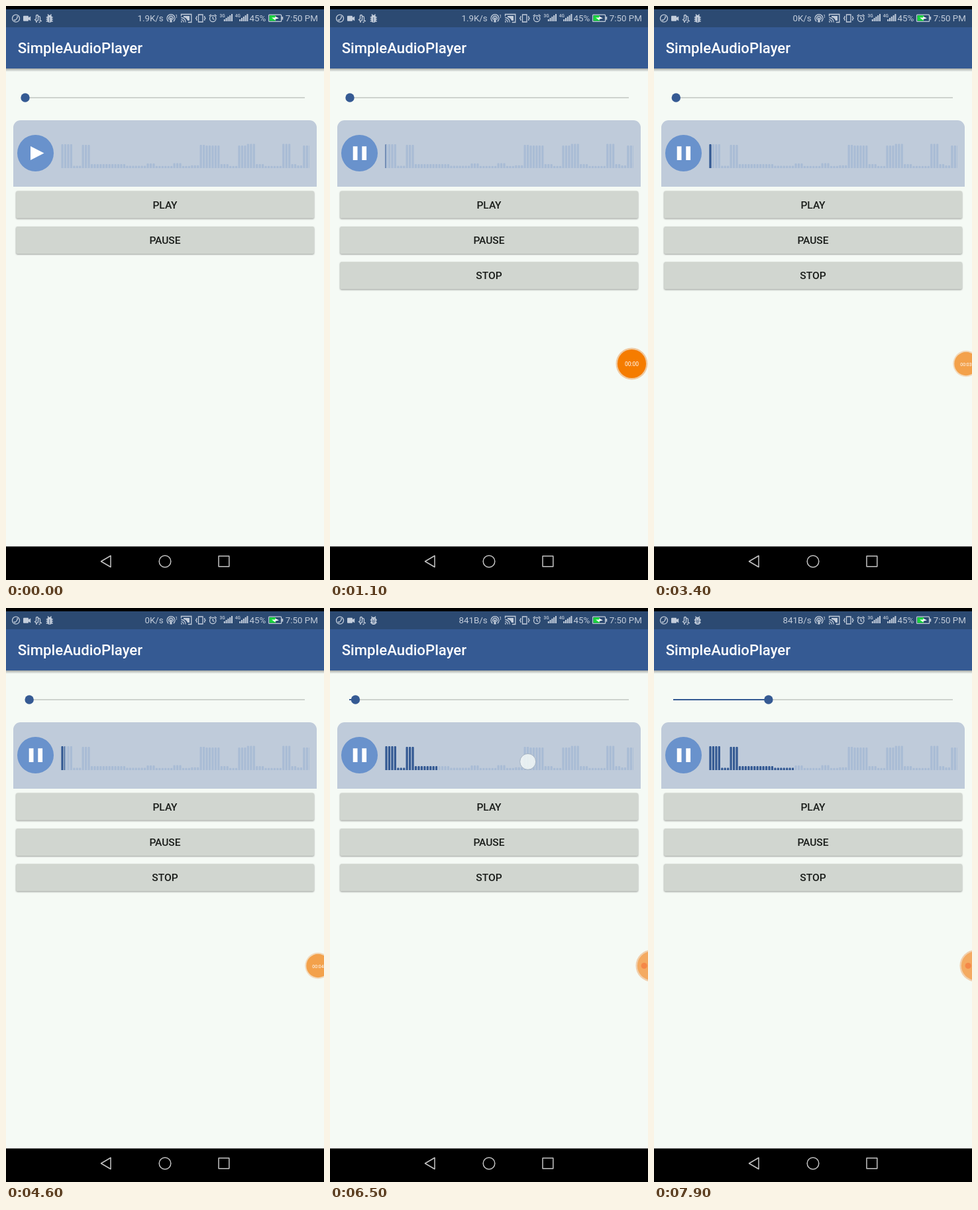
An HTML page for the animation above (8000 ms loop, 480x864 px).

```html
<!DOCTYPE html>
<html lang="en">
<head>
<meta charset="utf-8">
<title>Audio player</title>
<style>
  html, body { margin: 0; width: 100%; height: 100%; overflow: hidden; background: #f5faf5; }
  svg { display: block; width: 480px; height: 864px; font-family: Roboto, sans-serif; }
  .medium { font-weight: 500; }
  .status { font-size: 13.33px; fill: #c3cddb; }
  .icon { fill: #c3cddb; }
  .line { fill: none; stroke: #c3cddb; stroke-width: 1.3; }
  .button rect { fill: #d1d6d0; filter: drop-shadow(0 1px 1px rgba(0,0,0,.38)); }
  .button text { font-size: 15.55px; font-weight: 500; fill: #181b18; text-anchor: middle; }
  .nav { fill: none; stroke: #c4c4c4; stroke-width: 1.5; stroke-linejoin: round; }
</style>
</head>
<body>
<svg viewBox="0 0 480 864">
  <defs>
    <linearGradient id="shade" x2="0" y2="1">
      <stop offset="0" stop-color="#000" stop-opacity=".32"/>
      <stop offset="1" stop-color="#000" stop-opacity="0"/>
    </linearGradient>
    <clipPath id="played"><rect id="playedBox" x="83" y="200" width="0" height="50"/></clipPath>
    <clipPath id="waveBox"><rect x="83" y="200" width="375" height="50"/></clipPath>
    <g id="signal">
      <path d="M0 23h2v-3h-2zM2.8 23h2v-5h-2zM5.6 23h2v-7h-2zM8.4 23h2v-9h-2zM11.2 23h2v-11h-2z"/>
    </g>
  </defs>

  <rect width="480" height="864" fill="#f5faf5"/>
  <rect y="94" width="480" height="5" fill="url(#shade)"/>
  <rect width="480" height="6" fill="#000"/>
  <rect y="5" width="480" height="27" fill="#2c4a72"/>
  <rect y="32" width="480" height="62" fill="#355a93"/>
  <text class="medium" x="17.7" y="71" font-size="22.2" fill="#fff">SimpleAudioPlayer</text>

  <!-- status bar, left -->
  <circle class="line" cx="15" cy="18.7" r="5.5" stroke-width="1"/>
  <path class="line" d="M12.6 21.8q3.6-1.2 4.8-5.4M12 20.4l1.8 2M16.2 15.7l2 1"/>
  <rect class="icon" x="26" y="14.8" width="8" height="8" rx="1"/>
  <path class="icon" d="M33 18l4.2-2.6v7L33 19.8z"/>
  <path class="line" stroke-width="1.1" d="M43.5 20.5l2-1V14.5q1.5-2 3 0v7l-3 1zM48.5 16q3-1.5 3 2v4.5h2.5M45 24h2M49.5 24.5h2"/>
  <g id="bug">
    <path class="line" stroke-width="1.1" d="M63 12.5l1.6 2M68.5 12.5l-1.6 2M60.8 17h2M60.8 20h2M60.8 23h2M68.7 17h2M68.7 20h2M68.7 23h2"/>
    <rect class="icon" x="62.3" y="13.8" width="7" height="11" rx="3.4"/>
    <path d="M65.8 17v7" stroke="#2c4a72" stroke-width=".8"/>
  </g>
  <g id="bugAlt">
    <path class="line" stroke-width="1.1" d="M62.5 12.8l1.6 1.8M69 12.8l-1.6 1.8M60.8 18h10M61 22h9.6"/>
    <rect class="icon" x="61.8" y="13.8" width="8" height="11.2" rx="3.8"/>
    <path d="M63.5 17h1.6M66.5 17h1.6M63.2 19.6h5.2M64 22.3h3.6" stroke="#2c4a72" stroke-width="1.1"/>
  </g>

  <!-- status bar, right -->
  <text id="speed" class="status" x="237.7" y="23" text-anchor="end"></text>
  <path class="line" d="M245.3 23.3a6 6 0 1 1 7.4 0M246.7 20.8a3.2 3.2 0 1 1 4.6 0"/>
  <circle class="icon" cx="249" cy="18.9" r="1.6"/>
  <path class="icon" d="M247.8 20h2.4l.6 4.5h-3.6z"/>
  <text class="status" x="255" y="18" font-size="8" style="font-size:8px">1</text>
  <path class="line" stroke-width="1.6" d="M264.5 15.5v-3h15.3v12h-5M264.3 17.5a7 7 0 0 1 7 7M264.3 20.6a4 4 0 0 1 4 4"/>
  <path class="icon" d="M268 15h9v7h-3q-1.5-4.5-6-5zM264 22.6a2 2 0 0 1 2 2h-2z"/>
  <path class="line" stroke-width="1.5" d="M290.5 13h6.5v11h-6.5zM287.8 15v2l-1.3 1.5 1.3 1.5v2M299.7 15v2l1.3 1.5-1.3 1.5v2"/>
  <circle class="line" cx="312.2" cy="19" r="4.7"/>
  <path class="line" d="M312.2 16v3.2l2.3 1.3M306.6 15.3l3-2.6M317.8 15.3l-3-2.6"/>
  <g class="icon medium" font-size="6.5">
    <text x="322.5" y="17">3G</text><use href="#signal" x="328.8"/>
    <text x="345.8" y="17">4G</text><use href="#signal" x="352.2"/>
  </g>
  <text class="status" x="367.6" y="23">45%</text>
  <rect class="line" x="396.6" y="13.2" width="19" height="10.2" rx="1" stroke-width="1.1"/>
  <rect class="icon" x="416.3" y="16" width="1.9" height="4.6"/>
  <rect x="397.6" y="14.2" width="9.5" height="8.2" fill="#19d53c"/>
  <path d="M401 17.6l5.5-.1-.5-2.1 6 3.2-5.6 1.1.4 2z" fill="#fff"/>
  <text class="status" x="421.8" y="23">7:50 PM</text>

  <!-- seek bar -->
  <rect x="29" y="137" width="422" height="2" fill="#ced3ce"/>
  <rect id="seekFill" x="29" y="137" width="0" height="2" fill="#355a93"/>
  <circle id="thumb" cx="29" cy="138" r="6.7" fill="#355a93"/>

  <!-- waveform card -->
  <path d="M11 272V183a11 11 0 0 1 11-11H458a11 11 0 0 1 11 11V272z" fill="#bfcbda"/>
  <circle cx="44.5" cy="221.5" r="27.5" fill="#6992cc"/>
  <path id="playIcon" d="M37 211v21l20.5-10.5z" fill="#fff"/>
  <path id="pauseIcon" d="M34.7 211.3h6.8v20.8h-6.8zM48.3 211.3h6.8v20.8h-6.8z" fill="#fff"/>
  <g clip-path="url(#waveBox)">
    <path id="wave" fill="#a9bcd5"/>
    <path id="waveDone" fill="#355a93" clip-path="url(#played)"/>
  </g>
  <circle id="touch" cy="231.3" r="12" fill="#f1f7f6" fill-opacity=".85" stroke="#a3b1c1" stroke-width="1"/>

  <g id="buttons"></g>

  <g id="bubble">
    <circle id="ring" cy="538.5"/>
    <circle id="disc" cy="538.5"/>
    <text id="clock" y="541.5" text-anchor="middle" fill="#fff"></text>
    <circle id="dot" cx="474.2" cy="538.5" r="4.6" fill="#f58848"/>
  </g>

  <rect y="813.5" width="480" height="51" fill="#000"/>
  <path class="nav" d="M143.5 836L158 827.5v17z"/>
  <circle class="nav" cx="240" cy="836" r="8.8"/>
  <rect class="nav" x="321" y="828" width="15.8" height="15.8"/>
</svg>
<script>
const LOOP = 8000, STEP = 100;
const START = 300, DRAG = 6200, RELEASE = 6700;
const WAVE_X = 83.4, PITCH = 4.45;
const $ = id => document.getElementById(id);
const set = (id, attrs) => { for (const k in attrs) $(id).setAttribute(k, attrs[k]); };
const show = (id, on) => set(id, { visibility: on ? 'visible' : 'hidden' });

// bar runs: [count, height]
const runs = [[4, 36], [3, 3.6], [3, 35], [12, 6], [7, 3.6], [3, 7], [6, 3.3], [3, 7.5],
  [3, 3.3], [3, 4.2], [2, 35], [5, 34], [3, 6], [3, 3.3], [3, 34], [3, 36.5], [3, 6],
  [6, 3.3], [3, 36.5], [2, 6], [2, 4], [3, 34]];
const bars = runs.flatMap(([n, h]) => Array(n).fill(h));
const wavePath = bars.map((h, i) =>
  `M${WAVE_X + i * PITCH} 244v${1 - h}q0-1 1-1h1.2q1 0 1 1v${h - 1}z`).join('');
set('wave', { d: wavePath });
set('waveDone', { d: wavePath });

$('buttons').innerHTML = ['PLAY', 'PAUSE', 'STOP'].map((label, i) =>
  `<g class="button" id="b${label}" transform="translate(0 ${i * 53.33})">
    <rect x="15.2" y="278.6" width="449.8" height="41" rx="2.2"/>
    <text x="240" y="304.5">${label}</text></g>`).join('');

// Linear value between [time, value] stops.
function track(stops, t) {
  let prev = stops[0];
  if (t <= prev[0]) return prev[1];
  for (const next of stops) {
    if (t < next[0]) return prev[1] + (next[1] - prev[1]) * (t - prev[0]) / (next[0] - prev[0]);
    prev = next;
  }
  return prev[1];
}
const held = (stops, t) => stops.filter(s => t >= s[0]).pop()[1];

const bubbleX = [[2000, 455.5], [2300, 471], [4900, 471], [5300, 485.5]];
const bubbleR = [[2000, 21.6], [2300, 17.7], [4900, 17.7], [5300, 21.6]];
const discAlpha = [[2000, 1], [2300, .6], [4900, .6], [5300, .44]];
const ringAlpha = [[2000, .42], [2300, .28], [4900, .28], [5300, .36]];
const speeds = [[0, '1.9K/s'], [2900, '0K/s'], [5800, '841B/s']];
const clocks = [[0, '00:00'], [1200, '00:01'], [2200, '00:02'], [3300, '00:03'], [4200, '00:04']];

function draw(t) {
  const playing = t >= START;
  show('playIcon', !playing);
  show('pauseIcon', playing);
  show('bSTOP', playing);
  show('bug', t < 5800);
  show('bugAlt', t >= 5800);
  $('speed').textContent = held(speeds, t);

  const tick = Math.floor((t - 200) / 300) * 300 + 200;
  const run = Math.max(0, tick - 450) / 1000;
  const after = Math.max(0, tick - RELEASE) / 1000;
  const released = t > RELEASE;
  const seek = released ? 142.3 + after * 1.56 : run * 1.56;
  set('thumb', { cx: 29 + seek });
  set('seekFill', { width: seek });

  const dragged = track([[DRAG, 91.5], [RELEASE, 209.3]], t);
  const edge = released ? 209.5 + after * 1.4 : t >= DRAG ? dragged : 83.4 + run * 1.4;
  set('playedBox', { width: edge > 83.4 ? edge - 83 : 0 });
  show('touch', t >= DRAG && !released);
  set('touch', { cx: dragged + 136.5 });

  const cx = track(bubbleX, t), r = track(bubbleR, t);
  set('bubble', { opacity: track([[0, 0], [300, 1]], t) });
  set('ring', { cx, r: r * 1.11, fill: '#e8842a', 'fill-opacity': track(ringAlpha, t) });
  set('disc', { cx, r, fill: '#f57c00', 'fill-opacity': track(discAlpha, t) });
  set('clock', { x: cx, 'font-size': r * .395 });
  $('clock').textContent = held(clocks, t);
  show('clock', t < 5000);
  show('dot', t >= 5000);
}

const origin = performance.now();
function frame() {
  const t = (performance.now() - origin) % LOOP;
  draw(Math.floor(t / STEP) * STEP);
  requestAnimationFrame(frame);
}
draw(0);
requestAnimationFrame(frame);
</script>
</body>
</html>
```
